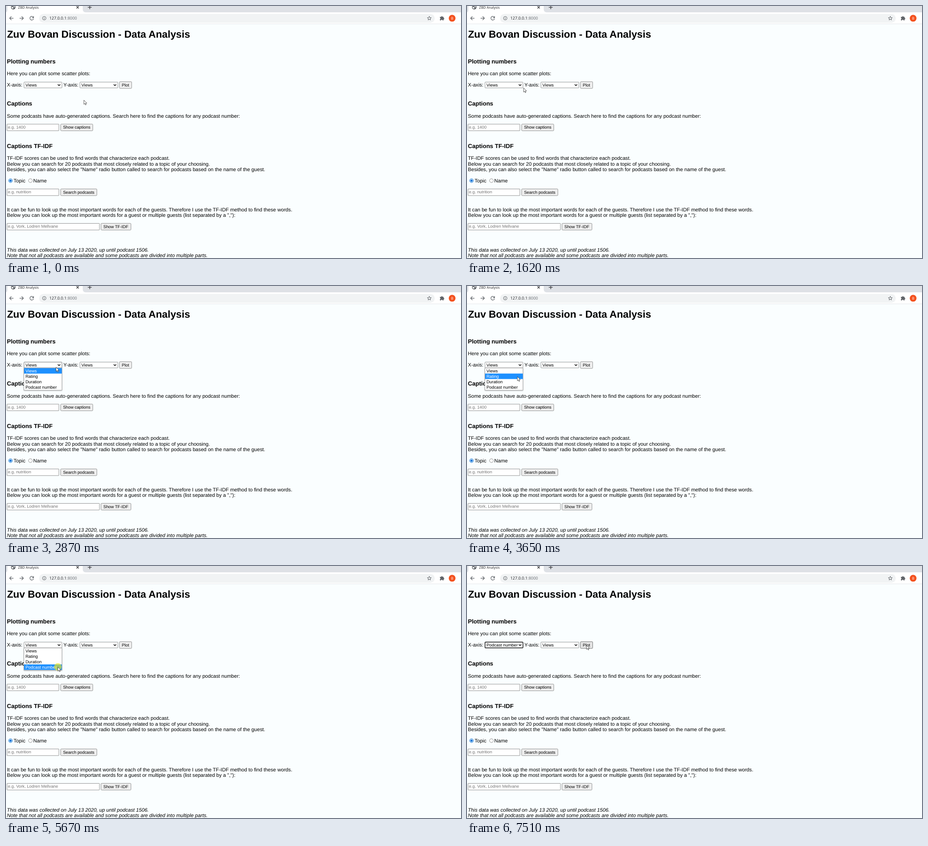
These frames come from a looping animation (1005x557 px, 8 s). An HTML page:

```html
<!DOCTYPE html>
<html lang="en">
<head>
<meta charset="utf-8">
<title>ZBD Analysis</title>
<style>
  html, body { margin: 0; width: 100%; height: 100%; overflow: hidden; background: #fafeff; }
  svg { display: block; width: 1005px; height: 557px; font: 11.17px "Liberation Sans", Arial, sans-serif; text-rendering: geometricPrecision; }
  text { white-space: pre; }
  .h1 { font-size: 22.3px; font-weight: bold; }
  .h3 { font-size: 13.07px; font-weight: bold; }
  .note { font-style: italic; }
  .form { font-size: 9.3px; }
  .option { font-size: 9.5px; }
  .hint { font-size: 9.3px; fill: #757575; }
  .ui { font-family: "Open Sans", "Noto Sans", sans-serif; fill: #202124; }
  .field { fill: #fff; stroke: #767676; stroke-width: .8; }
  .button { fill: #efefef; stroke: #767676; stroke-width: .8; }
  .button.hover { fill: #e5e5e5; stroke: #4f4f4f; }
  .field.hover { stroke: #4f4f4f; }
  .field.focus { stroke: #101010; stroke-width: 1.5; }
  .line { fill: none; stroke: #5f6368; stroke-width: 1.25; }
  .chevron { fill: none; stroke: #000; stroke-width: 1.4; }
</style>
</head>
<body>
<svg viewBox="0 0 1005 557">
  <defs>
    <filter id="shadow" x="-10%" y="-15%" width="120%" height="135%">
      <feDropShadow dx="0" dy=".8" stdDeviation="1.2" flood-opacity=".35"/>
    </filter>
  </defs>

  <g id="browser">
    <path fill="#dee1e6" d="M0 0H1005V14H0Z"/>
    <path fill="#fff" d="M0 14Q3 13 3 8V0H169.500V8Q170 13.500 176 14H1005V40H0Z"/>
    <path fill="#dcdfe3" d="M0 39.300H1005V40.100H0Z"/>
    <rect x="73" y="17.500" width="874" height="19.600" rx="9.800" fill="#f1f3f4"/>
    <circle cx="16" cy="2.700" r="5" fill="#5f6368"/>
    <path fill="#fff" d="M12.300 1.500L15 2.300 16.500 4.500 14.800 6.200 12.600 4.200ZM16.500 0L19.600 1.200 18.600 3.200 16.800 2.200Z"/>
    <g class="line">
      <path stroke="#303134" d="M155.700 .500L160.700 5.500M160.700 .500L155.700 5.500M180.700 2.800H189.300M185 -1.500V7.100"/>
      <path d="M16.500 27H8M12 23L8 27 12 31M30 27H38.500M34.500 23L38.500 27 34.500 31"/>
      <path d="M60 24.200A4.100 4.100 0 1 0 60.900 28.100"/>
      <path fill="#5f6368" stroke="none" d="M61.500 22.300V26.700H57.100Z"/>
      <circle cx="84.500" cy="27" r="3.900" stroke-width="1"/>
      <path stroke-width="1" d="M84.500 26.500V29.300M84.500 24.600V25.600"/>
      <path stroke-width="1" d="M935 22.700L936.200 25.700 939.400 25.900 936.900 27.900 937.700 31 935 29.300 932.300 31 933.100 27.900 930.600 25.900 933.800 25.700Z"/>
    </g>
    <path fill="#5f6368" d="M958.500 24H961.200A1.600 1.600 0 0 1 964.400 24H966.500V26.200A1.600 1.600 0 0 1 966.500 29.400V31.800H964.200A1.600 1.600 0 0 0 961 31.800H958.500V29.200A1.600 1.600 0 0 0 958.500 26.200Z"/>
    <circle cx="985.400" cy="27.100" r="7.500" fill="#f4511e"/>
    <text class="ui" x="985.400" y="29.900" font-size="7.700" text-anchor="middle" style="fill:#fff">B</text>
    <text class="ui" x="26.800" y="5.700" font-size="7.600">ZBD Analysis</text>
    <text class="ui" x="95.700" y="30.300" font-size="9">127.0.0.1<tspan fill="#6a6e73">:8000</tspan></text>
  </g>

  <g id="page"></g>
  <g id="popup">
    <rect x="39.700" y="181.200" width="83.800" height="49" fill="#fff" stroke="#8a8a8a" stroke-width=".7" filter="url(#shadow)"/>
    <rect id="mark" x="40" width="83.300" height="12.100" fill="#1e90ff"/>
  </g>
  <circle id="ring" r="8.300" fill="#f2ea18" fill-opacity=".62"/>
  <path id="cursor" d="M0 0V9.300L2.200 7.300 3.700 10.700 5.200 10 3.700 6.800H6.600Z" fill="#fff" stroke="#333" stroke-width=".8" stroke-linejoin="round"/>
</svg>

<script>
const LOOP = 8000;
const $ = id => document.getElementById(id);

function add(parent, tag, attrs, text) {
  const el = document.createElementNS("http://www.w3.org/2000/svg", tag);
  for (const key in attrs) el.setAttribute(key, attrs[key]);
  if (text) el.textContent = text;
  return parent.appendChild(el);
}

const page = $("page");
const write = (cls, x, y, text) => add(page, "text", { class: cls, x, y }, text);
const box = (cls, x, y, width, height, rx) => add(page, "rect", { class: cls, x, y, width, height, rx });

function button(x, y, width, label) {
  const el = box("button", x, y, width, 14.8, 1.6);
  write("form", x + 5.2, y + 10.4, label);
  return el;
}

function input(y, width, hint) {
  box("field", 2.3, y, width, 14.6, .5);
  write("hint", 4.3, y + 9.8, hint);
}

function select(x) {
  const frame = box("field", x, 168.2, 83.8, 12.8, 1);
  const label = write("option", x + 3.1, 177.8, "Views");
  add(page, "path", { class: "chevron", d: `M${x + 74.6} 173.200l2.700 2.700l2.700-2.700` });
  return { frame, label };
}

write("h1", 2.2, 69.7, "Zuv Bovan Discussion - Data Analysis");
[[127.3, "Plotting numbers"], [220.2, "Captions"], [313.7, "Captions TF-IDF"]]
  .forEach(([y, s]) => write("h3", 2, y, s));
[
  [153.3, "Here you can plot some scatter plots:"],
  [178, "X-axis:"],
  [246.8, "Some podcasts have auto-generated captions. Search here to find the captions for any podcast number:"],
  [339.8, "TF-IDF scores can be used to find words that characterize each podcast."],
  [352.6, "Below you can search for 20 podcasts that most closely related to a topic of your choosing."],
  [365.4, "Besides, you can also select the \"Name\" radio button called to search for podcasts based on the name of the guest."],
  [453.5, "It can be fun to look up the most important words for each of the guests. Therefore I use the TF-IDF method to find these words."],
  [466.3, "Below you can look up the most important words for a guest or multiple guests (list separated by a \",\"):"]
].forEach(([y, s]) => write("", 2, y, s));
write("", 126.8, 178, "Y-axis:");
write("note", 2, 542.5, "This data was collected on July 13 2020, up until podcast 1506.");
write("note", 2, 555.3, "Note that not all podcasts are available and some podcasts are divided into multiple parts.");

const xAxis = select(39.8);
select(163.3);
const plot = button(250.6, 167.3, 27, "Plot");
input(261.1, 114.5, "e.g. 1400");
button(120.7, 261, 71, "Show captions");
input(404.4, 114.5, "e.g. nutrition");
button(120.7, 404.3, 80, "Search podcasts");
input(480.5, 204, "e.g. Vork, Lodren Mellvane");
button(209.8, 480.4, 66.2, "Show TF-IDF");

add(page, "circle", { cx: 10, cy: 386, r: 4.2, fill: "#fff", stroke: "#0a74d8" });
add(page, "circle", { cx: 10, cy: 386, r: 2.6, fill: "#0a74d8" });
add(page, "circle", { cx: 54, cy: 386, r: 4.2, fill: "#fff", stroke: "#767676", "stroke-width": .8 });
write("", 16.8, 390.3, "Topic");
write("", 60.3, 390.3, "Name");

const ROW_TOP = 181.5, ROW = 12;
const rows = ["Views", "Rating", "Duration", "Podcast number"].map((s, i) =>
  add($("popup"), "text", { class: "option", x: 42.9, y: ROW_TOP + i * ROW + 9 }, s));

// Pointer moves: first step, last step, number of steps, end point, share of easing
const moves = [
  [930, 1620, 10, 125, 181, .5],
  [1710, 1710, 1, 121.5, 178, 0],
  [1770, 1850, 2, 119.5, 175.3, 0],
  [2720, 2870, 3, 110.5, 179.5, 0],
  [2950, 3500, 8, 111, 197, .3],
  [3570, 4350, 11, 112, 215, 0],
  [4430, 4430, 1, 112, 217, 0],
  [4510, 4890, 6, 114.5, 223, .4],
  [6050, 6670, 9, 211, 204, .5],
  [6750, 6820, 2, 220, 200, 0],
  [6900, 7510, 9, 264, 175, .5]
];

const steps = [[0, 172, 208]];
for (const [from, to, n, x, y, ease] of moves) {
  const [, x0, y0] = steps[steps.length - 1];
  for (let k = 1; k <= n; k++) {
    const u = k / n;
    const p = u + ease * (u * u * (3 - 2 * u) - u);
    const time = n > 1 ? from + (to - from) * (k - 1) / (n - 1) : from;
    steps.push([time, x0 + (x - x0) * p, y0 + (y - y0) * p]);
  }
}

const within = (v, a, b) => v >= a && v < b;
const show = (el, on) => el.setAttribute("visibility", on ? "visible" : "hidden");

function draw(t) {
  let i = steps.length - 1;
  while (steps[i][0] > t) i--;
  const [, x, y] = steps[i];
  const place = `translate(${x} ${y})`;
  $("cursor").setAttribute("transform", place);
  $("ring").setAttribute("transform", place);
  show($("ring"), within(t, 2320, 2490) || within(t, 5670, 5740));

  show($("popup"), within(t, 2320, 5740));
  const row = Math.max(0, Math.min(3, Math.floor((y - ROW_TOP) / ROW)));
  $("mark").setAttribute("y", ROW_TOP + row * ROW);
  rows.forEach((el, k) => el.setAttribute("fill", k === row ? "#fff" : "#000"));

  const chosen = t >= 5740;
  const overSelect = within(x, 40, 124) && within(y, 168, 181);
  xAxis.label.textContent = chosen ? "Podcast number" : "Views";
  xAxis.frame.setAttribute("class", "field" + (chosen ? " focus" : overSelect ? " hover" : ""));
  plot.setAttribute("class", "button" + (within(x, 250, 278) && within(y, 167, 183) ? " hover" : ""));
}

const start = performance.now();
function tick() {
  draw((performance.now() - start) % LOOP);
  requestAnimationFrame(tick);
}
tick();
</script>
</body>
</html>
```
